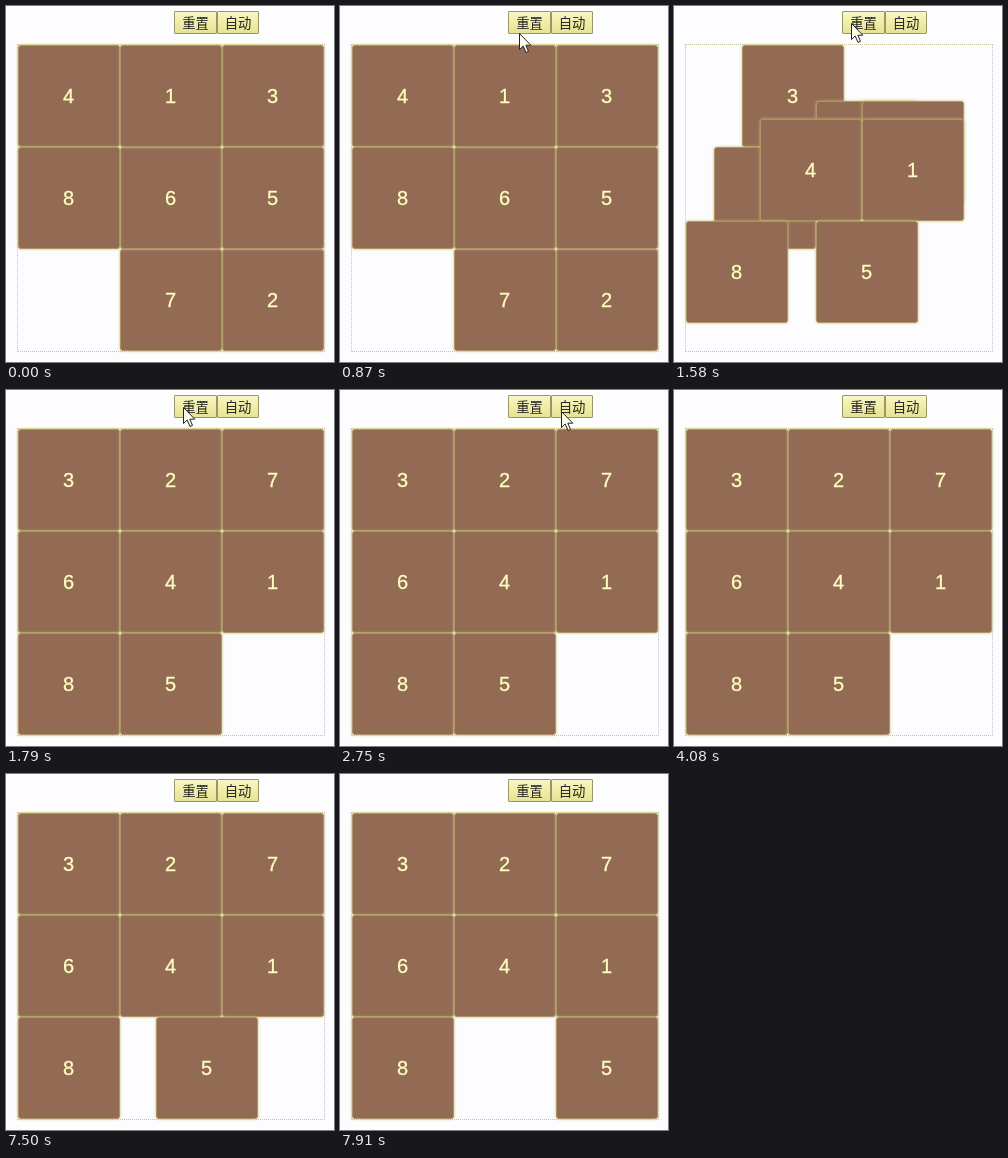
An HTML page that plays this animation: 328x356 px, repeating every 8 s.

```html
<!DOCTYPE html>
<html lang="zh">
<head>
<meta charset="utf-8">
<title>Sliding puzzle</title>
<style>
  html, body { margin: 0; width: 100%; height: 100%; overflow: hidden; background: #fdfcfe; }
  div, svg { position: absolute; box-sizing: border-box; }
  .button {
    top: 5px; height: 23px; border: 1px solid #9a9668; border-radius: 1px;
    background: linear-gradient(#f8f6cc, #f0eda6 50%, #e6e296);
    font: 13.33px/22px "Noto Sans CJK SC", "Noto Sans CJK", sans-serif;
    text-align: center; color: #222;
  }
  #board { left: 11px; top: 38px; width: 308px; height: 308px; border: 1px dotted #c9c79a; }
  .tile {
    left: 0; top: 0; width: 102px; height: 102px; padding-right: 1px;
    border: 1px solid #ac9468; border-radius: 3px;
    background: #936b54; box-shadow: 0 0 3px #c4c06a;
    font: 20px/100px "Liberation Sans", Arial, sans-serif;
    -webkit-text-stroke: .3px;
    text-align: center; color: #ffffbe;
  }
</style>
</head>
<body>
<div class="button" style="left:168px;width:43px">重置</div>
<div class="button" style="left:211px;width:42px">自动</div>
<div id="board"></div>
<svg id="cursor" width="14" height="22" style="left:0;top:0">
  <path d="M.5 .5V16.5L4.2 13L7 19.5L9.5 18.4L6.8 12.2H11.8Z" fill="#ffffee" stroke="#222"/>
</svg>
<script>
const LOOP = 8000, CELL = 102, SLIDE = 500;
const SHUFFLE_AT = 1256, SOLVE_AT = 7300;

// Each string lists the board row by row; 0 is the gap.
const boards = ['413865072', '327641850', '327641805'];

// Cursor visits: [time, x, y] points, hidden outside each visit.
const visits = [
  [[500, 316, 140], [620, 250, 88], [740, 196, 42], [870, 179, 27], [1080, 177, 17],
   [2250, 177, 17], [2550, 205, 29], [2870, 230, 17], [4000, 230, 17], [4080, 274, 30]],
  [[6370, 230, 20], [7330, 230, 20]]
];

const board = document.getElementById('board');
const cursor = document.getElementById('cursor');
const mix = (a, b, p) => a + (b - a) * p;

const swing = (t, start) => {
  const p = Math.min(1, Math.max(0, (t - start) / SLIDE));
  return 0.5 - Math.cos(p * Math.PI) / 2;
};

const place = (el, x, y) => el.style.transform = `translate(${x}px, ${y}px)`;

const tiles = [...'32764185'].map(label => {
  const el = document.createElement('div');
  el.className = 'tile';
  el.textContent = label;
  board.append(el);
  const stops = boards.map(b => {
    const i = b.indexOf(label);
    return [i % 3 * CELL, Math.floor(i / 3) * CELL];
  });
  return { el, stops };
});

function cursorAt(t) {
  for (const points of visits) {
    const i = points.findIndex(p => t < p[0]);
    if (i < 1) continue;
    const [t0, x0, y0] = points[i - 1], [t1, x1, y1] = points[i];
    const p = (t - t0) / (t1 - t0);
    return [mix(x0, x1, p), mix(y0, y1, p)];
  }
}

function draw() {
  const t = performance.now() % LOOP;
  const shuffled = swing(t, SHUFFLE_AT), solved = swing(t, SOLVE_AT);
  for (const { el, stops: [a, b, c] } of tiles) {
    const [x, y] = [0, 1].map(k => Math.round(mix(mix(a[k], b[k], shuffled), c[k], solved)));
    place(el, x, y);
  }
  const pos = cursorAt(t);
  cursor.style.visibility = pos ? 'visible' : 'hidden';
  if (pos) place(cursor, ...pos.map(Math.round));
  requestAnimationFrame(draw);
}
draw();
</script>
</body>
</html>
```
